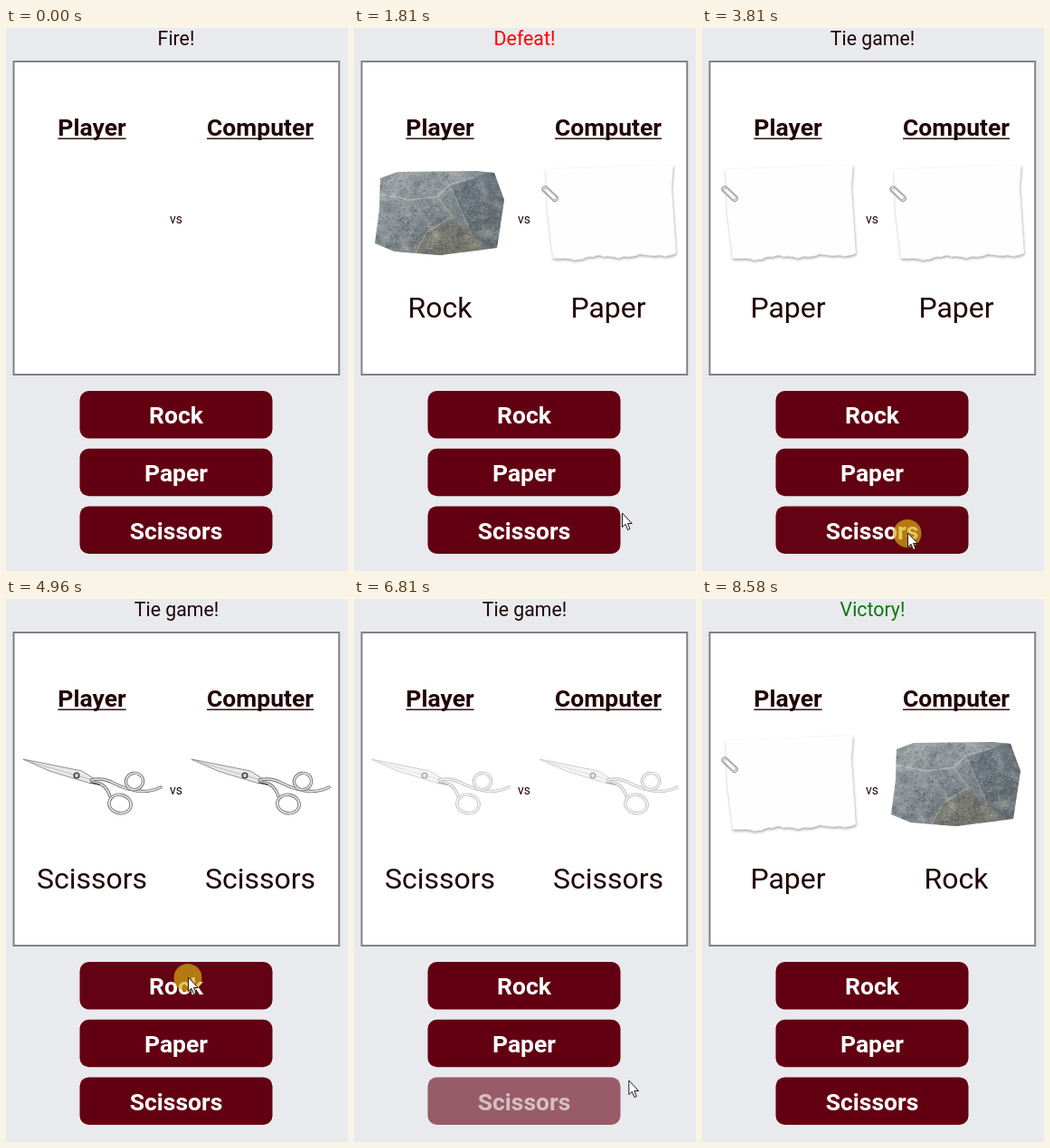
Write an HTML page with a canvas that moves like this. It is 378x600 px and loops after 9130 ms.

```html
<!DOCTYPE html>
<html lang="en">
<head>
<meta charset="utf-8">
<title>Rock Paper Scissors</title>
<style>
html, body { margin: 0; width: 100%; height: 100%; overflow: hidden; background: #e9eaee; }
canvas { display: block; width: 378px; height: 600px; }
</style>
</head>
<body>
<canvas id="stage"></canvas>
<script>
const W = 378, H = 600, LOOP = 9130, FADE = 300, DIM = 0.3, PRESS = 190, SHIFT = 186;
const INK = '#210305', FONT = 'Roboto, "Liberation Sans", sans-serif';
const scale = window.devicePixelRatio || 1;
const canvas = document.getElementById('stage');
canvas.width = W * scale;
canvas.height = H * scale;
const ctx = canvas.getContext('2d');
ctx.scale(scale, scale);

const BUTTONS = ['Rock', 'Paper', 'Scissors'];
const RESULTS = { Defeat: '#ff0000', 'Tie game': INK, Victory: '#087a08' };

// at: moment of the result, lead: how long before it the click ring shows,
// click and rest: pointer places, away: time from one to the other
const rounds = [
  { at: 1060, lead: 330, player: 'Rock', computer: 'Paper', result: 'Defeat',
    click: [160, 421], rest: [296, 536], away: 680, via: [-38, 662] },
  { at: 2540, lead: 330, player: 'Paper', computer: 'Paper', result: 'Tie game',
    click: [250, 476], rest: [318, 518], away: 500 },
  { at: 4000, lead: 270, player: 'Scissors', computer: 'Scissors', result: 'Tie game',
    click: [227, 558], rest: [326, 486], away: 300 },
  { at: 5150, lead: 330, player: 'Rock', computer: 'Scissors', result: 'Victory',
    click: [201, 418], rest: [246, 513], away: 300 },
  { at: 5745, lead: 170, player: 'Paper', computer: 'Paper', result: 'Tie game',
    click: [246, 513], rest: [240, 536], away: 300 },
  { at: 6680, lead: 340, player: 'Scissors', computer: 'Scissors', result: 'Tie game',
    click: [236, 546], rest: [318, 529], away: 300 },
  { at: 7540, lead: 240, player: 'Paper', computer: 'Rock', result: 'Victory',
    click: [248, 490], rest: [310, 309], away: 580 }
];

const linear = k => k;
const easeOut = k => 1 - (1 - k) ** 3;
const clamp = v => Math.max(0, Math.min(1, v));
const mix = (a, b, k) => a + (b - a) * k;

function buildLegs() {
  const legs = [{ start: 345, end: 500, from: [160, 504], to: rounds[0].click, ease: linear }];
  rounds.forEach((r, i) => {
    const prev = rounds[i - 1];
    if (prev) {
      const end = r.at - r.lead;
      const start = Math.max(prev.at + prev.away, end - 390);
      legs.push({ start, end, from: prev.rest, to: r.click, ease: linear });
    }
    legs.push({ start: r.at, end: r.at + r.away, from: r.click, to: r.rest,
      via: r.via, ease: r.via ? linear : easeOut });
  });
  legs.push({ start: 8250, end: 8520, from: rounds.at(-1).rest, to: [282, 559], ease: linear });
  return legs;
}
const legs = buildLegs();

function pointerAt(t) {
  const leg = legs.findLast(l => l.start <= t);
  if (!leg || t > 8570) return null;
  const k = leg.ease(clamp((t - leg.start) / (leg.end - leg.start)));
  return leg.from.map((a, i) => {
    const b = leg.to[i];
    return leg.via ? mix(mix(a, leg.via[i], k), mix(leg.via[i], b, k), k) : mix(a, b, k);
  });
}

function random(seed) {
  return () => (seed = (seed * 16807) % 2147483647) / 2147483647;
}

function fill(c, d, color) {
  c.fillStyle = color;
  c.fill(new Path2D(d));
}

function stroke(c, d, color, width) {
  c.strokeStyle = color;
  c.lineWidth = width;
  c.stroke(new Path2D(d));
}

function sprite(paint) {
  const s = document.createElement('canvas');
  s.width = 190 * scale;
  s.height = 280 * scale;
  const c = s.getContext('2d');
  c.scale(scale, scale);
  c.lineJoin = c.lineCap = 'round';
  paint(c);
  return s;
}

function paintRock(c) {
  const rnd = random(77);
  c.clip(new Path2D('M29 166 L48 159 L136 158 L155 160 L166 190 L158 243 L95 251 L45 247 L23 238 L28 200Z'));
  const base = c.createLinearGradient(60, 150, 120, 255);
  base.addColorStop(0, '#a3a9ab');
  base.addColorStop(0.45, '#858e94');
  base.addColorStop(1, '#676c6d');
  c.fillStyle = base;
  c.fillRect(0, 150, 190, 110);
  fill(c, 'M106 173 L155 158 L170 190 L160 245 L130 228Z', 'rgba(85,98,110,.45)');
  fill(c, 'M80 226 L106 212 L132 228 L146 252 L66 252Z', 'rgba(135,122,95,.4)');
  for (let i = 0; i < 260; i++) {
    c.fillStyle = rnd() < 0.5 ? 'rgba(50,60,70,.09)' : 'rgba(205,206,198,.09)';
    c.beginPath();
    c.ellipse(20 + rnd() * 148, 156 + rnd() * 96, 3 + rnd() * 9, 2 + rnd() * 4, rnd() * 3, 0, 7);
    c.fill();
  }
  stroke(c, 'M28 184 L62 190 L92 186 L106 173 L137 164', 'rgba(205,207,200,.5)', 1.5);
  stroke(c, 'M92 186 L108 208 L80 226 L68 248 M106 173 L130 228', 'rgba(195,195,182,.4)', 1.2);
  for (let i = 0; i < 1800; i++) {
    c.fillStyle = rnd() < 0.5 ? 'rgba(40,48,56,.24)' : 'rgba(215,218,212,.24)';
    c.fillRect(20 + rnd() * 148, 156 + rnd() * 96, 0.7 + rnd() * 1.5, 0.7 + rnd());
  }
}

function paintPaper(c) {
  const rnd = random(19);
  let torn = '';
  for (let x = 170; x >= 32; x -= 4) {
    const y = 250 + (170 - x) * 0.04 + Math.sin(x * 0.13) * 1.5 + (rnd() - 0.5) * 2;
    torn += `L${x} ${y}`;
  }
  c.save();
  c.shadowColor = 'rgba(0,0,0,.36)';
  c.shadowBlur = 3 * scale;
  c.shadowOffsetX = 0.5 * scale;
  c.shadowOffsetY = 1.7 * scale;
  fill(c, `M26 156 L167 151 L165 176 ${torn} L28 205Z`, '#fefefe');
  c.restore();
  stroke(c, 'M' + torn.slice(1), '#e2e2e2', 0.8);
  c.translate(31, 183.5);
  c.rotate(0.75);
  for (const [inset, color] of [[0, '#949494'], [2, '#b5b5b5']]) {
    c.strokeStyle = color;
    c.lineWidth = 1.1;
    c.beginPath();
    c.roundRect(-11 + inset, -3.2 + inset / 2, 21 - inset * 2, 6.4 - inset, 3);
    c.stroke();
  }
}

function paintScissors(c) {
  const tube = d => {
    stroke(c, d, '#707070', 3.4);
    stroke(c, d, '#e6e6e6', 1.7);
  };
  fill(c, 'M19 177 L84 190 L98 199 L94 204 L48 190Z', '#e9e9e9');
  stroke(c, 'M98 199 L84 190 L19 177 L48 190 L94 204', '#858585', 0.9);
  stroke(c, 'M20 178 L92 199', '#aaaaaa', 0.7);
  tube('M94 200 Q106 197 118 203 T136 210 Q154 216 171 208');
  tube('M98 203 Q110 203 115 218');
  tube('M132.5 203 a9.5 9 -15 1 1 19 -3 a9.5 9 -15 1 1 -19 3');
  tube('M114 224 a12 10 12 1 1 24 5 a12 10 12 1 1 -24 -5');
  stroke(c, 'M94 203 L103 205', '#444444', 1.6);
  c.beginPath();
  c.arc(78, 195, 2.8, 0, 7);
  c.stroke();
}

const pictures = {
  Rock: sprite(paintRock),
  Paper: sprite(paintPaper),
  Scissors: sprite(paintScissors)
};

function text(str, x, y, size, color = INK, weight = 400) {
  ctx.font = `${weight} ${size}px ${FONT}`;
  ctx.textAlign = 'center';
  ctx.fillStyle = color;
  ctx.fillText(str, x, y);
}

function heading(str, x) {
  text(str, x, 119, 26.5, INK, 700);
  const w = ctx.measureText(str).width;
  ctx.fillRect(x - w / 2, 121.5, w, 1.4);
}

function choice(name, dx, alpha) {
  ctx.globalAlpha = alpha;
  ctx.drawImage(pictures[name], dx, 0, 190, 280);
  ctx.globalAlpha = 1;
  text(name, 95 + dx, 320, 32);
}

function buttonAlpha(name, t) {
  const r = rounds.find(r => r.player === name && t >= r.at - PRESS && t <= r.at + FADE);
  if (!r) return 1;
  const part = t < r.at ? 1 - clamp((t - r.at + PRESS) / 100) : (t - r.at) / FADE;
  return mix(DIM, 1, part);
}

function drawButton(name, i, t) {
  const y = 401 + i * 63.7;
  ctx.globalAlpha = buttonAlpha(name, t);
  ctx.fillStyle = '#620012';
  ctx.beginPath();
  ctx.roundRect(81.5, y, 213, 52.5, 10);
  ctx.fill();
  text(name, 188, y + 36.3, 26.5, '#ffffff', 700);
  ctx.globalAlpha = 1;
}

function drawPointer(t) {
  const p = pointerAt(t);
  if (!p) return;
  ctx.save();
  ctx.translate(p[0], p[1] - 0.5);
  if (rounds.some(r => t >= r.at - r.lead && t < r.at - 110)) {
    ctx.beginPath();
    ctx.arc(0, 1, 15.5, 0, 7);
    ctx.fillStyle = 'rgba(216,176,20,.69)';
    ctx.fill();
  }
  const arrow = 'M.5 .5 V16 L4 12.8 L6.6 19 L9 18 L6.5 12 H11.3Z';
  fill(ctx, arrow, '#ffffff');
  stroke(ctx, arrow, '#1a1a1a', 1);
  ctx.restore();
}

function draw(t) {
  ctx.fillStyle = '#e9eaee';
  ctx.fillRect(0, 0, W, H);
  ctx.fillStyle = '#ffffff';
  ctx.strokeStyle = '#828282';
  ctx.lineWidth = 2;
  ctx.fillRect(8.5, 37, 359.7, 346);
  ctx.strokeRect(8.5, 37, 359.7, 346);

  heading('Player', 95);
  heading('Computer', 95 + SHIFT);
  text('vs', 188, 216, 14);

  const n = rounds.findLastIndex(r => r.at <= t);
  if (n < 0) {
    text('Fire!', 188, 19, 21.3);
  } else {
    const now = rounds[n], before = rounds[n - 1] || {};
    const fade = clamp((t - now.at) / FADE);
    const alpha = side => now[side] === before[side] ? 1 : fade;
    text(now.result + '!', 188.5, 19, 21.3, RESULTS[now.result]);
    choice(now.player, 0, alpha('player'));
    choice(now.computer, SHIFT, alpha('computer'));
  }
  BUTTONS.forEach((name, i) => drawButton(name, i, t));
  drawPointer(t);
}

const start = performance.now();
function tick() {
  draw((performance.now() - start) % LOOP);
  requestAnimationFrame(tick);
}
tick();
</script>
</body>
</html>
```
